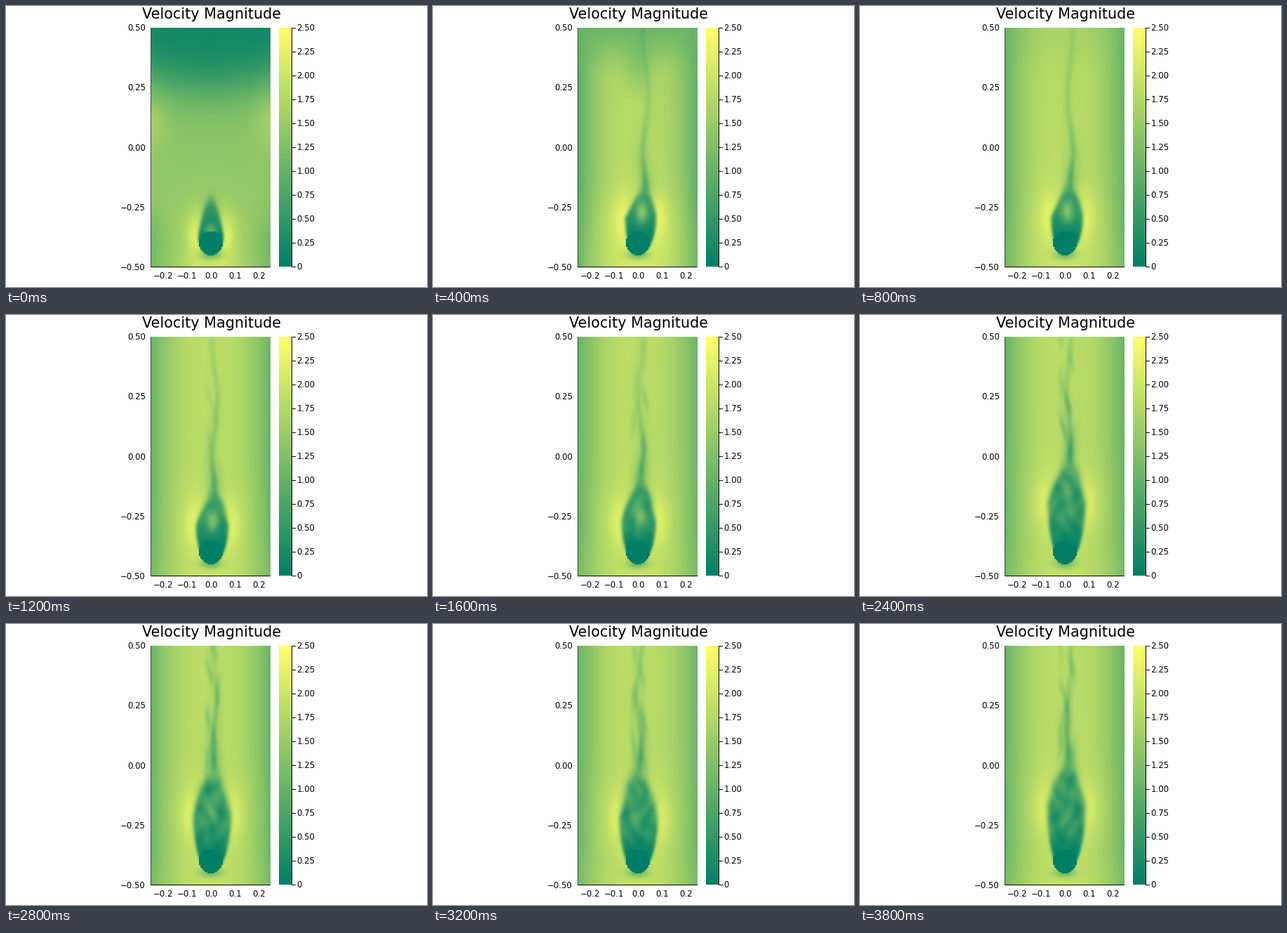
Recreate the animation shown at these times as a matplotlib script. Size 600 by 400 pixels, loop 4 s.

```python
import numpy as np
import matplotlib.pyplot as plt
from matplotlib.animation import FuncAnimation
from matplotlib.patches import Rectangle

FRAMES, STEP = 20, 200
LEFT, RIGHT, TOP, BOTTOM = 207, 377, 31, 371
CX, CY, RADIUS, FOOT = 292, 337.4, 17.2, 355
VMAX = 2.5
RISE = 230  # drift of shed eddies, pixels per second
PX = 0.72  # points per pixel at 100 dpi

# cell centres in stage pixels, two pixels per cell
X, Y = np.meshgrid(np.arange(LEFT + 1, RIGHT, 2.0),
                   np.arange(TOP + 1, BOTTOM, 2.0))
U = (X - CX) / 85

# growth of the wake bubble
TIMES = [0, 0.4, 1.2, 2.0, 2.4, 3.2, 3.8]
BUBBLE = {
    "left": [18, 18, 21, 25, 24, 26, 25],
    "right": [18, 26, 25, 26, 29, 28, 29],
    "waist": [327, 302, 300, 289, 268, 276, 262],
    "tip": [258, 252, 240, 200, 195, 190, 182],
    "lean": [0, 11, 4, 3, 5, 1, 4],
    "core": [0.8, 0.95, 0.85, 0.6, 0.3, 0.3, 0.2],
}


def smooth(a):
    a = np.clip(a, 0, 1)
    return a * a * (3 - 2 * a)


def gauss(d, width):
    return np.exp(-(d / width) ** 2 / 2)


def sigmoid(a):
    return 1 / (1 + np.exp(-np.clip(a, -40, 40)))


def mix(a, b, w):
    return a + (b - a) * w


def backgrounds():
    inflow = smooth((Y - 335) / 36) * np.exp(-(U / 0.55) ** 2)

    # rising front
    start = 1.4 - 1.25 * sigmoid((118 - 16 * U ** 2 - Y) / 22)
    start += 0.25 * gauss(1 - abs(U), 0.18) * gauss(Y - 163, 26)
    start += 0.4 * inflow - 0.3 * U ** 4 * smooth((Y - 260) / 80)

    # developing channel
    lanes = 0.88 + 0.92 * (1 - abs(U) ** 2.6) + 0.15 * smooth((Y - 250) / 120)
    lanes -= 0.4 * gauss(U, 0.2) * smooth((150 - Y) / 70)
    young = mix(1.03, lanes, smooth((Y - 15) / 95)) + 0.08 * inflow

    steady = 1.02 + 0.84 * (1 - abs(U) ** 2.3)
    steady += 0.12 * smooth((Y - 300) / 70) * U ** 2 + 0.05 * inflow
    return start, young, steady


START, YOUNG, STEADY = backgrounds()
SOFT = np.interp(Y, [190, 290, 340], [4, 1.7, 0.9])
STAGNATION = gauss(X - CX, 11) * gauss(Y - 354, 5)
DISC = (X - CX) ** 2 + (Y - CY) ** 2 < RADIUS ** 2


def background(t):
    if t < 0.4:
        return mix(START, YOUNG, t / 0.4)
    return mix(STEADY, YOUNG, max(1 - (t - 0.4) / 0.8, 0) ** 2)


def make_eddies(count=28):
    rng = np.random.default_rng(5)
    return [dict(birth=0.3 + 0.14 * k,
                 x=CX + 3 + (-1) ** k * rng.uniform(2, 10),
                 tilt=rng.uniform(-0.25, 0.1),
                 length=rng.uniform(11, 20),
                 depth=rng.uniform(0.15, 0.3)) for k in range(count)]


EDDIES = make_eddies()


def trail(t, tip, lean):
    """Fraction of speed lost above the bubble."""
    above = np.maximum(tip + 15 - Y, 0)
    phase = (Y + RISE * t) / 28
    axis = CX + 2 + 0.8 * lean + 4 * smooth(above / 60) * np.sin(phase)
    gate = smooth((tip + 35 - Y) / 40) * smooth(t / 0.4)
    loss = gate * (0.1 + 0.2 * np.exp(-above / 70)) * gauss(X - axis, 3)
    loss += gate * 0.4 * np.exp(-above / 30) * gauss(X - axis, 7)
    loss += gate * 0.1 * np.exp(-above / 120) * gauss(X - axis, 12)
    for e in EDDIES:
        age = t - e["birth"]
        if not 0 < age < 1:
            continue
        dy = Y - (225 - RISE * age)
        x = e["x"] + e["tilt"] * dy + 2 * np.sin(dy / 11)
        fade = smooth(age / 0.25) * smooth(e["birth"] / 1.8) * (1 - 0.4 * age)
        loss += fade * e["depth"] * gauss(X - x, 2.8) * gauss(dy, e["length"])
    return np.clip(loss, 0, 0.85)


def swirl(t):
    p = X + 5 * np.sin((Y + 90 * t) / 11)
    q = Y + 90 * t + 7 * np.sin(X / 7 + 2 * t)
    return np.sin(p / 5) * np.sin(q / 8)


def speed_field(t):
    b = {name: np.interp(t, TIMES, keys) for name, keys in BUBBLE.items()}
    waist, tip = b["waist"], b["tip"]

    # elliptic foot, tapering head
    up = np.clip((waist - Y) / (waist - tip), 0, 1)
    down = np.clip((Y - waist) / (FOOT - waist), 0, 1)
    shape = np.sqrt(1 - down ** 2) * (1 - up ** 1.25)
    axis = CX + b["lean"] * up
    ripple = 3 * up * smooth(t) * np.sin((Y + RISE * t) / 12)
    lo = axis - b["left"] * shape + ripple
    hi = axis + b["right"] * shape + ripple
    wake = sigmoid((X - lo) / SOFT) - sigmoid((X - hi) / SOFT)

    flow = background(t)
    amp = 0.42 + 0.3 * np.exp(-t / 0.2)
    for x in (CX - b["left"] - 4, CX + b["right"] + 4):
        flow = flow + amp * (0.65 * gauss(X - x, 9) * gauss(Y - waist, 22)
                             + 0.35 * gauss(X - x, 26) * gauss(Y - waist, 38))
    flow = mix(flow, 0.8, 0.75 * STAGNATION)
    flow = flow * (1 - trail(t, tip, b["lean"]))

    # slow, swirling fluid with a lighter core
    inner = 0.45 + 0.22 * smooth((t - 0.4) / 1.6) * swirl(t)
    inner = inner * smooth((345 - Y) / 65)
    inner = inner + (b["core"] * gauss(X - CX - 0.5 * b["lean"], 6)
                     * gauss(Y - waist + 8, 0.2 * (FOOT - waist)))
    inner = mix(inner, flow, 0.8 * smooth((up - 0.5) / 0.5))

    v = mix(flow, inner, wake)
    v[DISC] = 0
    return np.clip(v, 0, VMAX)


FIELDS = [speed_field(i * STEP / 1000) for i in range(FRAMES)]

plt.rcParams["font.family"] = "DejaVu Sans"
fig = plt.figure(figsize=(6, 4), dpi=100, facecolor="white")
ax = fig.add_axes([0, 0, 1, 1])
ax.axis("off")


def label(x, y, text, ha, size=11.8):
    text = text.replace("-", "\u2212")
    ax.text(x, y, text, ha=ha, va="baseline", fontsize=size * PX, color="black")


def bar(x, y, w, h, color="black"):
    ax.add_patch(Rectangle((x, y), w, h, fc=color, lw=0, antialiased=False))


def heat(data, *extent):
    return ax.imshow(data, extent=extent, cmap="summer", vmin=0, vmax=VMAX,
                     interpolation="nearest", aspect="auto")


image = heat(FIELDS[0], LEFT, RIGHT, BOTTOM, TOP)
heat(np.linspace(VMAX, 0, 256)[:, None], 389, 407, BOTTOM, TOP)
ax.set_xlim(0, 600)
ax.set_ylim(400, 0)

label(292.5, 18, "Velocity Magnitude", "center", 20.75)
bar(206, 31, 1, 341, "#444444")
bar(206, 371, 171, 1)
for i in range(5):
    label(199, 35.3 + 85.1 * i, f"{0.5 - 0.25 * i:.2f}", "right")
for i in range(-2, 3):
    label(CX + 34.1 * i, 388, f"{i / 10:.1f}", "center")

bar(407, 31, 1, 341)
for i in range(11):
    y = BOTTOM - 34 * i
    bar(407, y, 6, 1)
    label(414.5, y + 4.3, f"{0.25 * i:.2f}" if i else "0", "left")


def update(i):
    image.set_data(FIELDS[i])
    return (image,)


anim = FuncAnimation(fig, update, frames=FRAMES, interval=STEP, repeat=True,
                     repeat_delay=0, blit=False)
plt.show()
```
